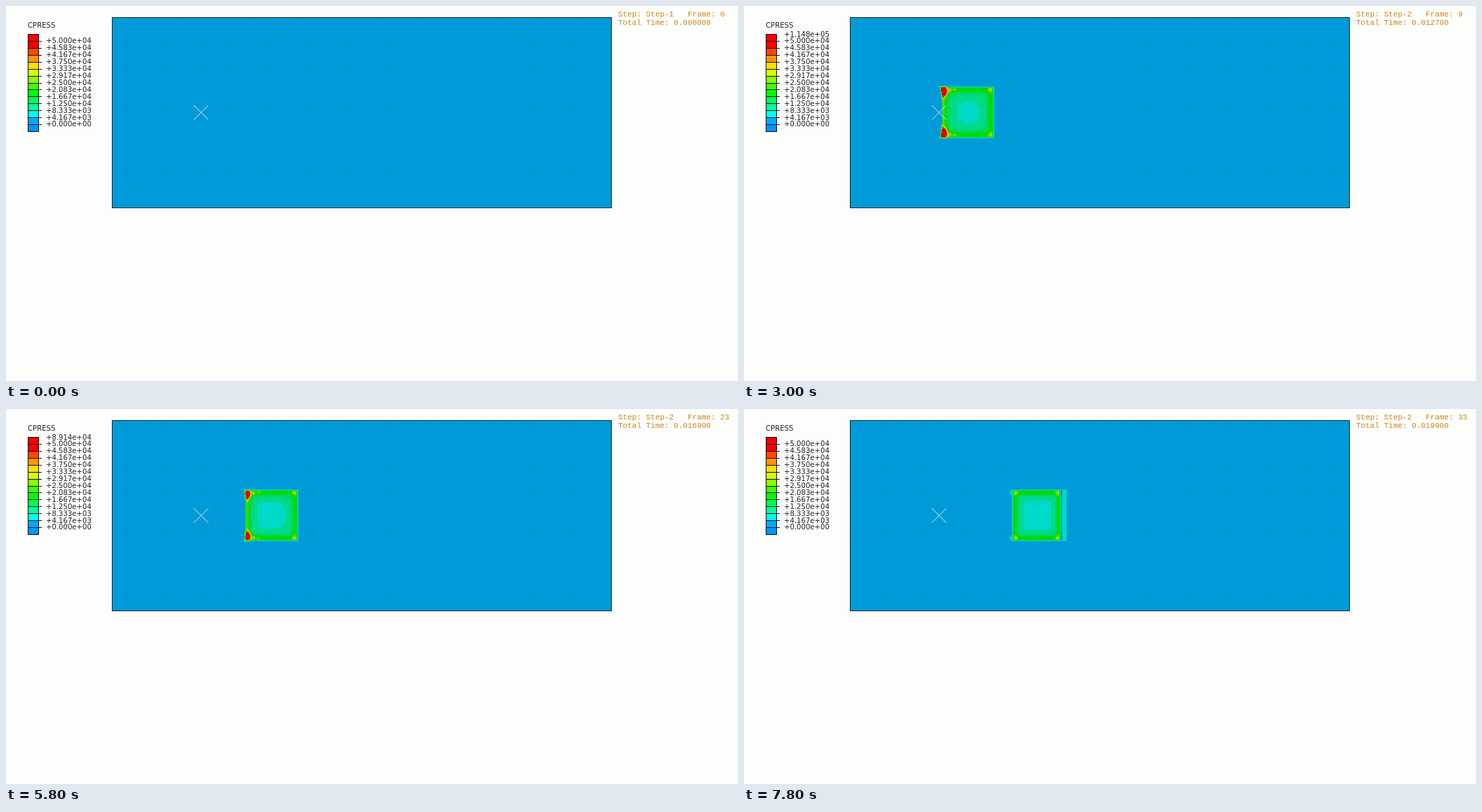
Animation of 1044x536 px, one loop 8 s. Source, as an HTML page with a canvas:

```html
<!DOCTYPE html>
<html lang="en">
<head>
<meta charset="utf-8">
<title>Contact pressure</title>
<style>
html, body { margin: 0; width: 100%; height: 100%; overflow: hidden; background: #fdfdfc; }
canvas, svg { position: absolute; left: 0; top: 0; display: block; }
.legend { font: 10.1px "DejaVu Sans", sans-serif; fill: #222; }
.info { font: 11.03px "Liberation Mono", monospace; fill: #c8861e; white-space: pre; }
</style>
</head>
<body>
<canvas id="stage" width="1044" height="536"></canvas>
<svg id="overlay" width="1044" height="536" viewBox="0 0 1044 536">
  <g id="legend" class="legend">
    <text x="31" y="31">CPRESS</text>
    <text id="peak" x="57" y="43.6"></text>
  </g>
  <rect x="151.5" y="16.5" width="711.5" height="271.5" fill="none" stroke="#06283c" shape-rendering="crispEdges"/>
  <path d="M268 142l20.500 20.500M288.500 142l-20.500 20.500" stroke="#d4e4ea" fill="none"/>
  <text id="step" class="info" xml:space="preserve" x="873" y="14.5"></text>
  <text id="time" class="info" xml:space="preserve" x="873" y="27"></text>
</svg>
<script>
const STEP_MS = 200, STEPS = 40, PRESS_STEPS = 6;
const LIMIT = 50000, BANDS = 12, BAND = LIMIT / BANDS;
const PLATE = { x: 152, y: 17, w: 711, h: 271 };
const START = 241.5, SPEED = 4.28, TOP = 115.5, HEIGHT = 73;

const clamp = v => Math.max(0, Math.min(1, v));
const ramp = (v, a, b) => clamp((v - a) / (b - a));
const pulse = (v, at, span) => clamp(1 - Math.abs(v - at) / span);
const bump = (x, y, sx, sy) => Math.exp(-((x / sx) ** 2 + (y / sy) ** 2) / 2);
const byId = id => document.getElementById(id);
const ctx = byId("stage").getContext("2d");

// Rainbow from blue (below zero) through cyan and green to red
function bandColor(i) {
  const hue = i < 1 ? 200 - 5 * i : 175 * (1 - (i - 1) / (BANDS - 2));
  return [0, 4, 2].map(n => Math.round(255 * clamp(Math.abs((hue / 60 + n) % 6 - 3) - 1)));
}
const meshColors = Array.from({ length: BANDS }, (_, i) => bandColor(i).map(c => c * 0.87));

function sci(v) {
  const [m, e] = v.toExponential(3).split("e+");
  return `+${m}e+${e.padStart(2, "0")}`;
}

// The block is pressed down, slides right, leans on its rear edge and recovers
function poseAt(k) {
  const hot = ramp(k, 11, 16) * (1 - ramp(k, 26, 32));
  const lean = pulse(k, 11, 5);
  const strip = ramp(k, 35, 39);
  const w = 76.3 - 7 * strip;
  return {
    w, hot, strip,
    left: START + SPEED * Math.max(0, k - PRESS_STEPS),
    load: clamp(k / 5),
    cx: w / 2 + 1.5 * hot + 7 * lean + strip,
    rx: 23 - 8 * hot - 9 * lean - 3 * strip,
    ry: 23 - 8 * hot - 2 * lean - 2 * strip,
    power: 5 - 3 * hot - 2.5 * lean + 3 * strip,
    edge: 13000 * hot + 16000 * lean,
    streak: lean + 0.7 * pulse(k, 33, 5)
  };
}

// Contact pressure at a point measured from the block's upper left corner
function pressure(p, x, y) {
  const mid = y - HEIGHT / 2, v = Math.abs(mid) / (HEIGHT / 2);
  const dy = Math.min(y, HEIGHT - y);
  const inset = p.hot * (2.5 - 4 * v ** 5);
  const flare = 1.5 * p.hot * bump(x - 3, 0, 5, 1);
  const d = Math.min(x - inset, p.w - x, dy + flare);

  if (d < -1) {
    const inStrip = x > p.w + 2 && x < p.w + 7.5 && dy > -0.5;
    const inLobe = bump(x + 1.5, dy - 4, 1.6, 3) > 0.5;
    return inStrip || inLobe ? 7500 * p.strip : 0;
  }

  // Low core, rising towards a firm rim
  const rho = (Math.abs((x - p.cx) / p.rx) ** p.power +
    Math.abs(mid / p.ry) ** p.power) ** (1 / p.power);
  const out = (rho - 1) * Math.min(p.rx, p.ry);
  let q = 6500;
  if (out > 0) q = 8400 + 11800 * (out / (out + Math.max(d - 4.5, 0))) ** 2.3;
  if (d > 7 && x < 30) q += p.streak * 2800 * Math.sin(x * 1.15);
  if (d > 7) q -= 4200 * p.hot * bump(x - 10, mid, 1.5, 7);

  // Corner spots, rear edge and hot rear corners
  const dx = Math.min(x, p.w - x);
  q += 13000 * bump(dx - 4.7, dy - 4.5, 2, 2);
  q += p.edge * bump(x - 3.5, 0, 1.3, 1) * (0.45 + 0.55 * v * v) * (dy > 2);
  const taper = 3.5 - 0.12 * Math.max(dy - 7, 0);
  q += p.hot * (90000 * bump(x - 4.3, dy - 7, taper, 4.6) +
    24000 * bump(x - 13.5, dy - 5, 1.4, 1.6) +
    9000 * bump(x - 20.5, dy - 4.5, 1.5, 1.8));
  return q * p.load * ramp(d, -1, 2);
}

function drawPatch(p) {
  const x0 = Math.floor(p.left) - 5, y0 = Math.floor(TOP) - 4;
  const w = 96, h = 82;
  const img = ctx.getImageData(x0, y0, w, h);
  for (let y = 0; y < h; y++) {
    for (let x = 0; x < w; x++) {
      const q = pressure(p, x0 + x + 0.5 - p.left, y0 + y + 0.5 - TOP);
      if (q < BAND) continue;
      img.data.set(meshColors[Math.min(BANDS - 1, Math.floor(q / BAND))], (y * w + x) * 4);
    }
  }
  ctx.putImageData(img, x0, y0);
}

function drawMesh() {
  const { x, y, w, h } = PLATE;
  ctx.fillStyle = "rgba(0,30,60,0.03)";
  for (let i = 0; i < w; i += 3) ctx.fillRect(x + i, y, 1, h);
  for (let i = 0; i < h; i += 3) ctx.fillRect(x, y + i, w, 1);
}

function draw(k) {
  ctx.clearRect(0, 0, 1044, 536);
  ctx.fillStyle = "#009ddc";
  ctx.fillRect(PLATE.x, PLATE.y, PLATE.w, PLATE.h);
  const p = poseAt(k);
  drawPatch(p);
  drawMesh();

  const sliding = k >= PRESS_STEPS, frame = sliding ? k - PRESS_STEPS : k;
  const time = sliding ? 0.01 + frame * 0.0003 : frame * 0.002;
  byId("step").textContent = `Step: Step-${sliding ? 2 : 1}   Frame: ${frame}`;
  byId("time").textContent = `Total Time: ${time.toFixed(6)}`;
  const peak = 46000 + (85700 + 20 * k) * p.hot;
  byId("peak").textContent = peak > LIMIT ? sci(peak) : "";
}

function buildLegend() {
  const cell = 9.93, top = 40;
  let html = "";
  for (let i = 0; i <= BANDS + 1; i++) {
    const y = Math.round(top + i * cell) + 0.5;
    const h = Math.round(top + (i + 1) * cell) + 0.5 - y;
    const color = bandColor(Math.min(BANDS - 1, BANDS - i));
    html += `<rect x="31.5" y="${y}" width="15" height="${h}" fill="rgb(${color})" stroke="#111" shape-rendering="crispEdges"/>`;
    if (!i) continue;
    html += `<path d="M47 ${y}h4" stroke="#111"/>`;
    html += `<text x="57" y="${top + i * cell + 3.4}">${sci(BAND * (BANDS + 1 - i))}</text>`;
  }
  byId("legend").insertAdjacentHTML("beforeend", html);
}

let shown = -1;
function tick(now) {
  const k = Math.floor(now / STEP_MS) % STEPS;
  if (k !== shown) draw(shown = k);
  requestAnimationFrame(tick);
}

buildLegend();
draw(0);
requestAnimationFrame(tick);
</script>
</body>
</html>
```
